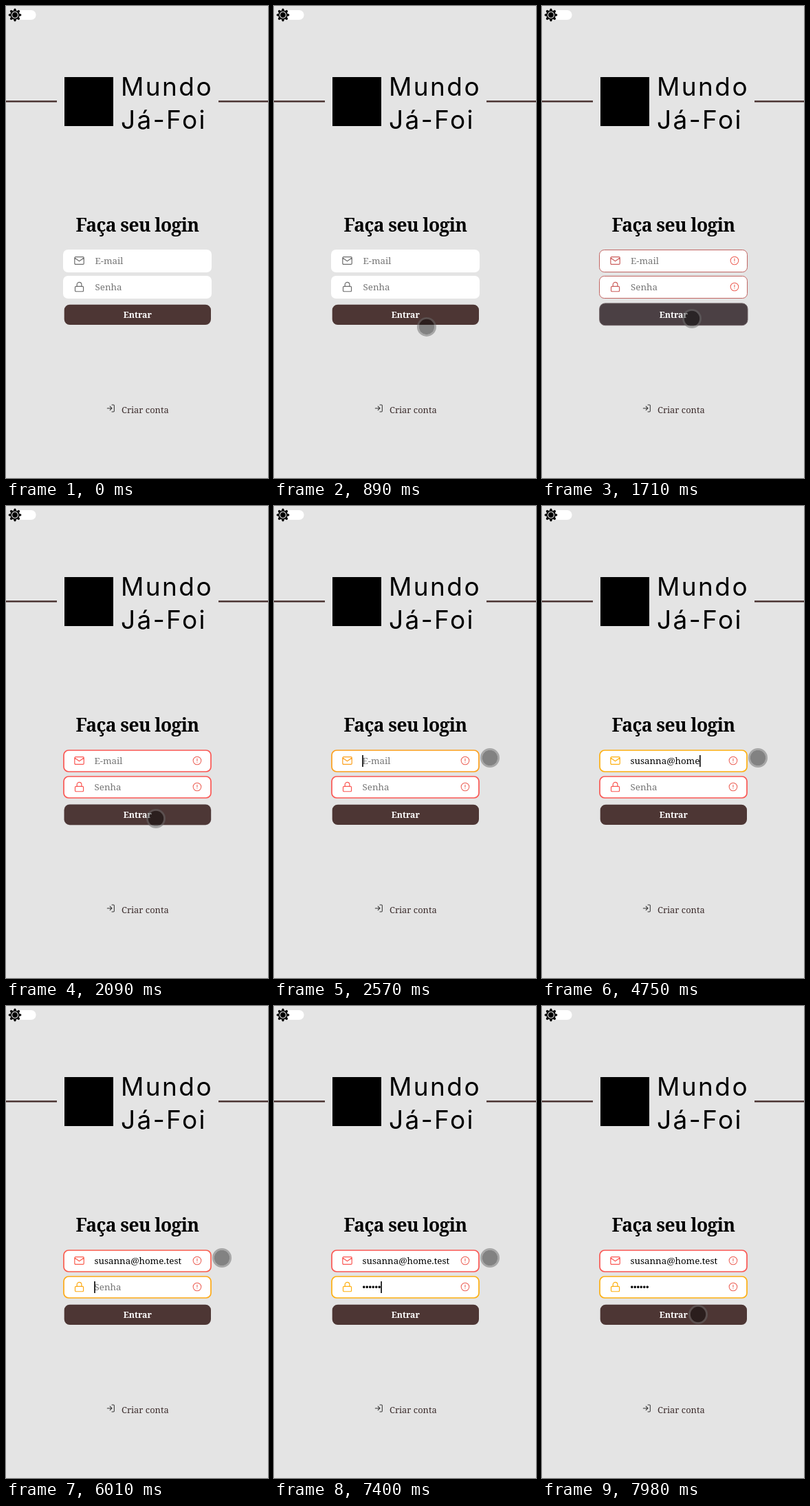
An HTML page that plays this animation: 381 px wide and 684 px high, repeating every 8 s.

```html
<!DOCTYPE html>
<html lang="pt-BR">
<head>
<meta charset="utf-8">
<title>Login</title>
<style>
html, body { margin: 0; width: 100%; height: 100%; overflow: hidden; background: #e4e4e4; }
svg { display: block; width: 100%; height: 100%; }
text { font: 13.33px "Noto Serif", serif; }
.brand { font: 400 37px Inter, sans-serif; letter-spacing: 2.4px; }
.title { font-weight: 700; font-size: 26.4px; letter-spacing: -.6px; text-anchor: middle; }
.enter { font-weight: 600; font-size: 12.3px; fill: #fff; text-anchor: middle; }
.link { font-size: 12.9px; fill: #3c2d2d; }
.dots { font: 12.9px "Liberation Sans", Arial, sans-serif; }
.icon { fill: none; stroke-width: 1.8; stroke-linecap: round; stroke-linejoin: round; }
</style>
</head>
<body>
<svg viewBox="0 0 381 684">
  <rect x="8" y="6" width="35.6" height="14" rx="7" fill="#fff"/>
  <g id="sun" transform="translate(13 13)">
    <circle r="6.2"/>
    <circle r="4.5" fill="none" stroke="#e4e4e4" stroke-width="1.1"/>
  </g>

  <path d="M0 138.25H74M309 138.25H381" stroke="#4d3634" stroke-width="2.3"/>
  <rect x="85" y="103" width="71" height="71"/>
  <text class="brand" x="167" y="130">Mundo</text>
  <text class="brand" x="167" y="178">Já-Foi</text>

  <text class="title" x="191" y="327">Faça seu login</text>
  <g id="form"></g>
  <rect id="button" rx="8"/>
  <text class="enter" x="191.3" y="452">Entrar</text>

  <path class="icon" stroke="#333" transform="translate(145.6 576.2) scale(.56)"
    d="M15 3h4a2 2 0 0 1 2 2v14a2 2 0 0 1-2 2h-4M10 17l5-5-5-5M15 12H3"/>
  <text class="link" x="168" y="590">Criar conta</text>

  <g id="pointer">
    <circle r="11.2" fill="#000" fill-opacity=".43"/>
    <circle r="12.6" fill="none" stroke="#696969" stroke-opacity=".5" stroke-width="2.8"/>
  </g>
</svg>
<script>
const LOOP = 8000;
const GREY = [110, 110, 110], DARK = [50, 50, 50], RED = [250, 88, 84], ORANGE = [253, 176, 18];
const MAIL = "M4 4h16a2 2 0 0 1 2 2v12a2 2 0 0 1-2 2H4a2 2 0 0 1-2-2V6a2 2 0 0 1 2-2zM22 6l-10 7L2 6";
const LOCK = "M5 11h14a2 2 0 0 1 2 2v7a2 2 0 0 1-2 2H5a2 2 0 0 1-2-2v-7a2 2 0 0 1 2-2zM7 11V7a5 5 0 0 1 10 0v4";
const ALERT = "M2 12a10 10 0 1 0 20 0a10 10 0 1 0-20 0M12 7v6M12 16.5v.2";

const EMAIL = "susanna@home.test";
const EMAIL_KEYS = [2980, 3040, 3200, 3380, 3580, 3750, 3900, 4270, 4450,
  4550, 4650, 4750, 4950, 5100, 5220, 5330, 5530];
const PASS_KEYS = [6130, 6280, 6540, 6790, 7120, 7400];

// time, x, y
const PATH = [
  [390, 351, 665], [560, 305, 607], [700, 264, 550], [800, 241, 500],
  [890, 222, 465], [1000, 219, 458], [1170, 218, 456], [1450, 218, 456],
  [1500, 218, 453], [2270, 218, 453], [2380, 217, 386], [2430, 217, 386],
  [2570, 314, 365], [7430, 314, 365], [7550, 299, 358], [7700, 262, 400],
  [7830, 232, 459], [7890, 229, 463], [7980, 227, 447]
];

const $ = id => document.getElementById(id);
const set = (el, attrs) => { for (const k in attrs) el.setAttribute(k, attrs[k]); };
const lerp = (a, b, p) => a + (b - a) * p;
const mix = (a, b, p) => a.map((v, i) => lerp(v, b[i], p));
const rgb = c => `rgb(${c.map(Math.round)})`;
const ramp = (t, from, to) => {
  const p = Math.min(1, Math.max(0, (t - from) / (to - from)));
  return 1 - (1 - p) ** 2;
};

function makeField(y, icon, hint) {
  const g = document.createElementNS("http://www.w3.org/2000/svg", "g");
  g.innerHTML = `<rect rx="7" fill="#fff"/>
    <path class="icon" d="${icon}" transform="translate(98.5 ${y + 8}) scale(.67)"/>
    <path class="icon" d="${ALERT}" stroke="#ec5f55"/>
    <text y="${y + 21}"></text>
    <path stroke="#000" stroke-width="1.6"/>`;
  $("form").append(g);
  const [box, mark, alert, label, caret] = g.children;

  return ({ error, tint, typed, dots, focus }) => {
    const w = Math.floor(error * 2);
    set(box, { x: 83 + w / 2, y: y + w / 2, width: 216 - w, height: 33 - w,
      stroke: rgb(mix(DARK, tint, error)), "stroke-width": w * .85 });
    set(mark, { stroke: rgb(mix(GREY, tint, error)) });
    set(alert, {
      opacity: Math.min(1, error * 1.5),
      transform: `translate(${275 - 2 * w} ${y + 9}) scale(.58)`
    });
    set(label, { x: 129.5 - w / 2, fill: typed ? "#000" : "#757575", class: dots ? "dots" : "" });
    label.textContent = typed || hint;
    const x = 129 + (typed ? label.getComputedTextLength() : 0);
    set(caret, { d: `M${x} ${y + 8}v17`, opacity: focus ? 1 : 0 });
  };
}

const drawEmail = makeField(353, MAIL, "E-mail");
const drawPass = makeField(391, LOCK, "Senha");

for (let i = 0; i < 8; i++)
  $("sun").insertAdjacentHTML("beforeend",
    `<path d="M-2.6 -5.5L-1 -9.2H1L2.6 -5.5z" transform="rotate(${i * 45})"/>`);

function drawButton(t) {
  const p = ramp(t, 1450, 1600) - ramp(t, 1900, 2200);
  set($("button"), {
    x: 84.7 - p, y: 432.7 - 1.8 * p, width: 213.3 + 2 * p, height: 29.4 + 2.4 * p,
    fill: rgb(mix([77, 54, 52], [75, 64, 68], p)),
    stroke: "#6a5c60", "stroke-opacity": p
  });
}

function drawPointer(t) {
  const i = PATH.findIndex(k => k[0] > t);
  const b = PATH.at(i), a = i > 0 ? PATH[i - 1] : b;
  const p = b === a ? 1 : (t - a[0]) / (b[0] - a[0]);
  set($("pointer"), {
    transform: `translate(${lerp(a[1], b[1], p)} ${lerp(a[2], b[2], p)})`,
    visibility: t < PATH[0][0] ? "hidden" : "visible"
  });
}

function draw(now) {
  const t = now % LOOP;
  const typedCount = keys => keys.filter(k => k <= t).length;
  const error = ramp(t, 1500, 2000);
  const swap = ramp(t, 5690, 6130);
  drawEmail({
    error,
    tint: mix(RED, ORANGE, ramp(t, 2400, 2700) - swap),
    typed: EMAIL.slice(0, typedCount(EMAIL_KEYS)),
    focus: t >= 2400 && t < 5690
  });
  drawPass({
    error,
    tint: mix(RED, ORANGE, swap),
    typed: "•".repeat(typedCount(PASS_KEYS)),
    dots: t >= PASS_KEYS[0],
    focus: t >= 5690 && t < 7930
  });
  drawButton(t);
  drawPointer(t);
  requestAnimationFrame(draw);
}
requestAnimationFrame(draw);
</script>
</body>
</html>
```
